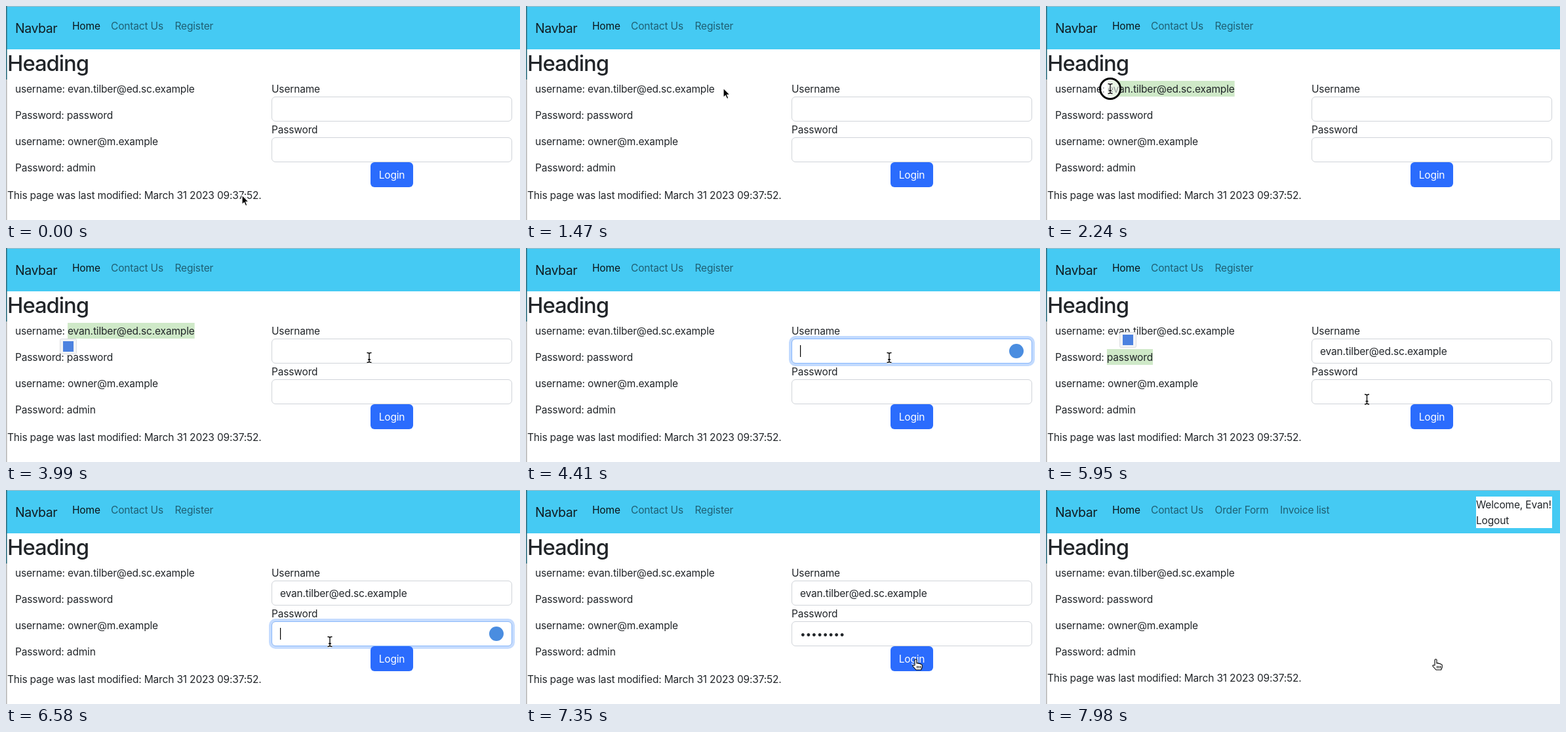
Recreate the animation shown at these times as an HTML page. Size 784x326 px, loop 8000 ms.

```html
<!DOCTYPE html>
<html lang="en">
<head>
<meta charset="utf-8">
<title>Login page</title>
<style>
  html, body { margin: 0; width: 100%; height: 100%; overflow: hidden; background: #fff; }
  svg { display: block; width: 784px; height: 326px; }
  text { font: 15.5px Inter, sans-serif; letter-spacing: -.17px; fill: #212529; }
  .brand { font-size: 19.4px; letter-spacing: -.4px; fill: #101c22; }
  .title { font-size: 32.75px; font-weight: 500; letter-spacing: -1px; }
  .active { fill: #0b1418; }
  .link { fill: #1f5f73; }
  .field rect { fill: #fff; stroke: #d0d4d9; }
  .field .ring { fill: none; stroke: #c2dafe; stroke-width: 4; }
  .field .edge { fill: none; stroke: #86b7fe; }
  .selection { fill: #cfe9c8; }
</style>
</head>
<body>
<svg viewBox="0 0 784 326">
  <rect width="784" height="66" fill="#45caf3"/>
  <rect width="784" height="1" fill="#a9b9c0"/>
  <rect width="1.6" height="112" fill="#2f6f80"/>
  <rect y="112" width="1.6" height="214" fill="#b8b8b8"/>
  <text class="brand" x="14" y="40.5">Navbar</text>
  <text class="active" x="101" y="36">Home</text>
  <text class="link" x="160" y="36">Contact Us</text>
  <text class="title" x="2" y="99">Heading</text>

  <rect class="selection" id="emailSelection" y="114" height="24"/>
  <rect class="selection" id="passwordSelection" y="154" height="24"/>
  <text id="emailLine" x="14" y="132">username: evan.tilber@ed.sc.example</text>
  <text id="passwordLine" x="14" y="172">Password: password</text>
  <text x="14" y="212">username: owner@m.example</text>
  <text x="14" y="252">Password: admin</text>
  <text id="modified" x="2">This page was last modified: March 31 2023 09:37:52.</text>

  <g id="loggedOut">
    <text class="link" x="257.5" y="36">Register</text>
    <text x="405" y="132">Username</text>
    <text x="405" y="194">Password</text>
    <g id="fields"></g>
    <rect x="556" y="238" width="65" height="38" rx="6" fill="#2b6cfd"/>
    <text x="588.5" y="263" text-anchor="middle" style="fill:#fff">Login</text>
  </g>
  <g id="loggedIn">
    <text class="link" x="257.5" y="36">Order Form</text>
    <text class="link" x="357" y="36">Invoice list</text>
    <rect x="656" y="10" width="116" height="48" fill="#fff"/>
    <text x="656" y="28">Welcome, Evan!</text>
    <text x="656" y="52">Logout</text>
  </g>

  <g id="popup">
    <rect x=".5" y=".5" width="25" height="23" rx="2" fill="#f3f4f6" stroke="#dcdee2"/>
    <rect x="5" y="4" width="16" height="16" fill="#4c82e0"/>
  </g>

  <g id="pointer">
    <circle id="press" r="15.5" fill="#fff" fill-opacity=".55" stroke="#000" stroke-width="3"/>
    <path id="arrow" d="M0 0V14.5L3.3 11.5 5.5 16.5 7.9 15.5 5.8 10.4H10.2Z" stroke="#fff" stroke-width="1.2"/>
    <g id="beam" fill="none">
      <path id="beamShape" d="M-3.5-7.5Q-.5-7.5 0-6 .5-7.5 3.5-7.5M0-6V6M-3.5 7.5Q-.5 7.5 0 6 .5 7.5 3.5 7.5M-2 3H2" stroke="#fff" stroke-width="3"/>
      <use href="#beamShape"/>
      <path d="M-3.5-7.5Q-.5-7.5 0-6 .5-7.5 3.5-7.5M0-6V6M-3.5 7.5Q-.5 7.5 0 6 .5 7.5 3.5 7.5M-2 3H2" stroke="#000" stroke-width="1.3"/>
    </g>
    <path id="hand" d="M-1.5 9V1.2a1.5 1.5 0 0 1 3 0V6q2-1 3 .5 2-.6 2.8.8 2-.2 2.4 1.4V12l-1.6 4H.5L-4.5 10.5q-.6-2 1.4-1.6zM2.2 10v3.5M4.7 10v3.5M7.2 10v3.5" fill="#fff" stroke="#000" stroke-width="1.1" stroke-linejoin="round"/>
  </g>
</svg>
<script>
const LOOP = 8000, STEP = 70, SIGNED_IN = 7700;
const el = id => document.getElementById(id);
const clamp = v => Math.max(0, Math.min(1, v));
const between = (t, [from, to]) => t >= from && t < to;
const show = (node, on) => node.style.display = on ? '' : 'none';

// Pointer route: time, x, y
const route = [
  [0, 360, 288], [140, 366, 284], [420, 347, 252], [560, 347, 252],
  [1260, 273, 126], [1330, 273, 126], [1470, 301, 125], [1540, 301, 125],
  [1680, 297, 129], [1820, 297, 129], [2030, 272, 116], [2100, 272, 116],
  [2240, 98, 126], [2660, 98, 126], [3080, 352, 146], [3290, 352, 146],
  [3780, 597, 160], [3990, 554, 167], [4550, 554, 167], [4830, 124, 157],
  [5180, 124, 157], [5460, 598, 221], [5810, 598, 221], [6090, 381, 240],
  [6160, 381, 240], [6440, 494, 231], [6720, 494, 231], [6930, 594.5, 258],
  [LOOP, 594.5, 258]
];
const presses = [[1680, 2450], [4130, 4270], [4900, 4970], [5110, 5180], [6440, 6510], [6930, 7000]];

// Areas with a text pointer: x, y, right, bottom
const textAreas = [[14, 114, 293, 138], [14, 154, 162, 178], [405, 138, 772, 176], [405, 200, 772, 238]];
const buttonArea = [556, 238, 621, 276];
const inside = (x, y, [l, t, r, b]) => x >= l && x <= r && y >= t && y <= b;

function pointerAt(t) {
  const i = route.findIndex(key => key[0] > t);
  const [t0, x0, y0] = route[i - 1], [t1, x1, y1] = route[i];
  const p = (t - t0) / (t1 - t0), e = p * p * (3 - 2 * p);
  return [x0 + (x1 - x0) * e, y0 + (y1 - y0) * e];
}

function makeField(y, value, focus, filledAt) {
  const g = document.createElementNS('http://www.w3.org/2000/svg', 'g');
  g.setAttribute('class', 'field');
  g.innerHTML = `<rect x="405.5" y="${y + .5}" width="366" height="37" rx="5.5"/>
    <g class="glow">
      <rect class="ring" x="403" y="${y - 2}" width="371" height="42" rx="8"/>
      <rect class="edge" x="405.5" y="${y + .5}" width="366" height="37" rx="5.5"/>
    </g>
    <circle cx="748" cy="${y + 19}" r="11" fill="#4a8de0"/>
    <text x="418" y="${y + 25}">${value}</text>
    <rect class="caret" y="${y + 10}" width="1.2" height="18" style="fill:#000;stroke:none"/>`;
  el('fields').append(g);
  const [glow, badge, text, caret] = ['.glow', 'circle', 'text', '.caret'].map(s => g.querySelector(s));
  const width = text.getComputedTextLength();
  return t => {
    const focused = between(t, focus), filled = t >= filledAt;
    glow.style.opacity = clamp((t - focus[0]) / 150) * (1 - clamp((t - focus[1]) / 150));
    show(badge, focused);
    show(text, filled);
    show(caret, focused && (t - focus[0]) % 1000 < 500);
    caret.setAttribute('x', 418 + (filled ? width : 0));
  };
}

const fields = [
  makeField(138, 'evan.tilber@ed.sc.example', [4130, 4900], 4550),
  makeField(200, '••••••••', [6440, 7070], 6720)
];

// Both lines start with a ten-character label.
const valueSpan = line => [14 + line.getSubStringLength(0, 10), 14 + line.getComputedTextLength()];
const emailSpan = valueSpan(el('emailLine'));
const passwordSpan = valueSpan(el('passwordLine'));

function select(node, from, to, on) {
  show(node, on);
  node.setAttribute('x', from);
  node.setAttribute('width', Math.max(0, to - from));
}

function render(t) {
  const [x, y] = pointerAt(t);
  const signedIn = t >= SIGNED_IN;
  const kind = inside(x, y, buttonArea) ? 'hand'
    : textAreas.some(area => inside(x, y, area)) ? 'beam' : 'arrow';

  el('pointer').setAttribute('transform', `translate(${x} ${y})`);
  for (const name of ['arrow', 'beam', 'hand']) show(el(name), name === kind);
  show(el('press'), presses.some(p => between(t, p)));

  const dragStart = t < 2240 ? Math.max(x, emailSpan[0]) : emailSpan[0];
  select(el('emailSelection'), dragStart, emailSpan[1], between(t, [1890, 4130]));
  select(el('passwordSelection'), ...passwordSpan, between(t, [5110, 6440]));

  const firstPopup = between(t, [2730, 4130]);
  show(el('popup'), firstPopup || between(t, [5250, 6440]));
  el('popup').setAttribute('transform', firstPopup ? 'translate(82 138)' : 'translate(112 128)');

  fields.forEach(update => update(t));
  show(el('loggedOut'), !signedIn);
  show(el('loggedIn'), signedIn);
  el('modified').setAttribute('y', signedIn ? 292 : 294);
}

function tick() {
  const t = performance.now() % LOOP;
  render(Math.floor(t / STEP) * STEP);
  requestAnimationFrame(tick);
}
tick();
</script>
</body>
</html>
```
